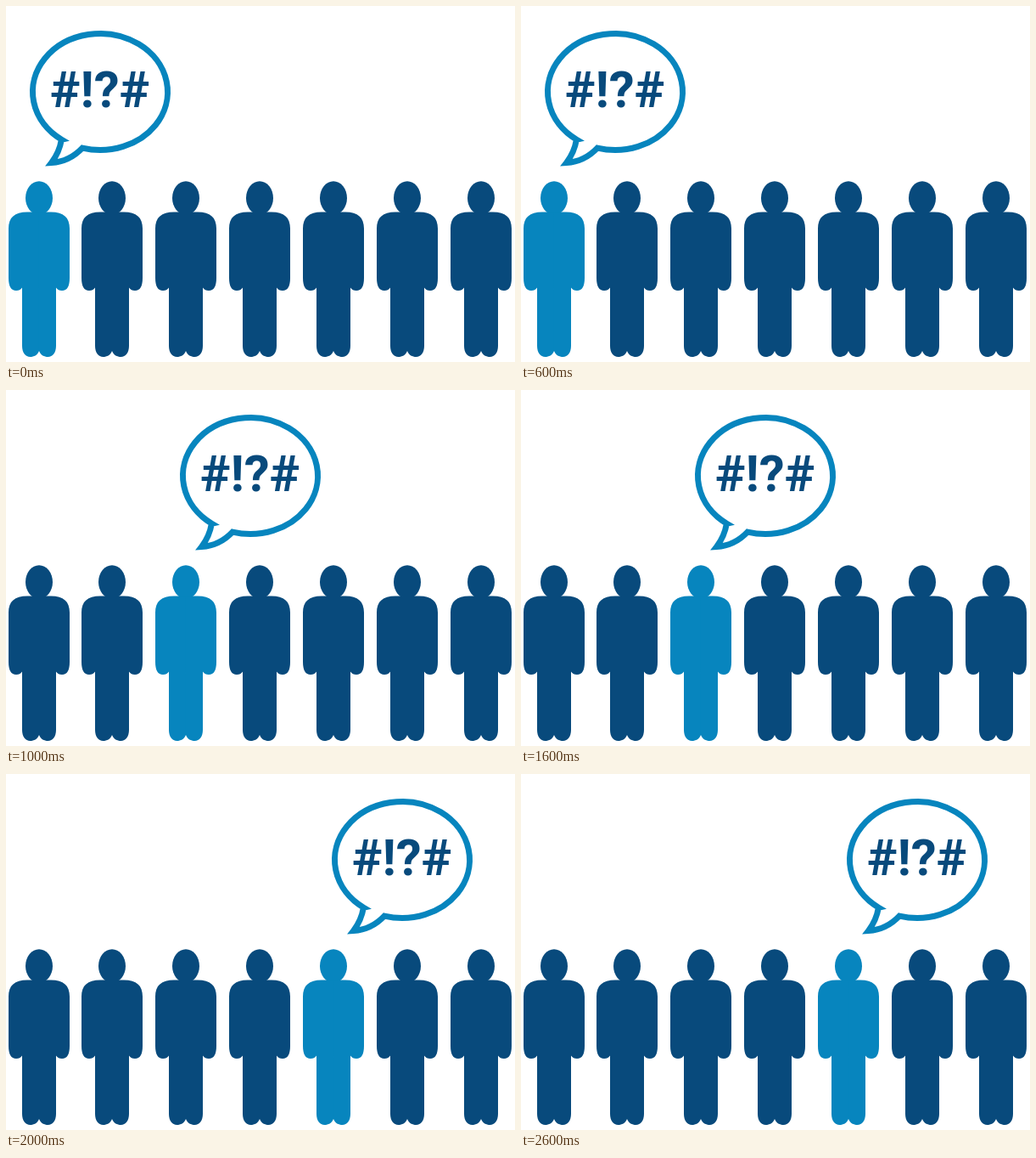
An HTML page with a canvas for the animation above (3000 ms loop, 600 by 419 pixels).

```html
<!DOCTYPE html>
<html lang="en">
<head>
<meta charset="utf-8">
<title>Passing it along the line</title>
<style>
  html, body { margin: 0; width: 100%; height: 100%; overflow: hidden; background: #fff; }
  canvas { display: block; }
</style>
</head>
<body>
<canvas id="stage" width="600" height="419"></canvas>
<script>
const ctx = document.getElementById('stage').getContext('2d');
const DARK = '#084a7c';
const LIGHT = '#0785be';
const STEP = 1000;
const people = [39, 125, 212, 299, 386, 473, 560];
const turns = [
  { speaker: 0, bubbleX: 111 },
  { speaker: 2, bubbleX: 288 },
  { speaker: 4, bubbleX: 467 }
];

// Right half of the outline, relative to the figure's centre line.
function halfBody(side) {
  ctx.save();
  ctx.scale(side, 1);
  ctx.beginPath();
  ctx.moveTo(-0.5, 242.5);
  ctx.lineTo(14, 242.5);
  ctx.bezierCurveTo(29, 242.5, 36, 249, 36, 262);
  ctx.lineTo(36, 320);
  ctx.bezierCurveTo(36, 330, 33, 335, 27, 335);
  ctx.quadraticCurveTo(22.5, 335, 20, 331.5);
  ctx.lineTo(20, 400);
  ctx.bezierCurveTo(20, 408, 16, 413, 10.5, 413);
  ctx.bezierCurveTo(6, 413, 2, 411, 0, 406);
  ctx.lineTo(-0.5, 406);
  ctx.closePath();
  ctx.fill();
  ctx.restore();
}

function person(x, color) {
  ctx.save();
  ctx.translate(x, 0);
  ctx.fillStyle = color;
  ctx.beginPath();
  ctx.ellipse(0, 226, 16, 19.7, 0, 0, Math.PI * 2);
  ctx.fill();
  halfBody(-1);
  halfBody(1);
  ctx.restore();
}

function bubble(x) {
  ctx.save();
  ctx.translate(x, 0);
  ctx.beginPath();
  ctx.ellipse(0, 101, 79.5, 68.5, 0, 2.18, 1.838 + Math.PI * 2);
  ctx.quadraticCurveTo(-36, 183, -57.5, 184.5);
  ctx.quadraticCurveTo(-48, 172, -45.6, 157.2);
  ctx.closePath();
  ctx.strokeStyle = LIGHT;
  ctx.lineWidth = 7;
  ctx.lineJoin = 'miter';
  ctx.stroke();

  ctx.fillStyle = DARK;
  ctx.font = '700 60px Roboto, sans-serif';
  ctx.textAlign = 'center';
  ctx.fillText('#!?#', -0.5, 119);
  ctx.restore();
}

function draw(now) {
  const { speaker, bubbleX } = turns[Math.floor(now / STEP) % turns.length];
  ctx.fillStyle = '#fff';
  ctx.fillRect(0, 0, 600, 419);
  people.forEach((x, i) => person(x, i === speaker ? LIGHT : DARK));
  bubble(bubbleX);
}

const start = performance.now();
function tick() {
  draw(performance.now() - start);
  requestAnimationFrame(tick);
}
tick();
</script>
</body>
</html>
```
